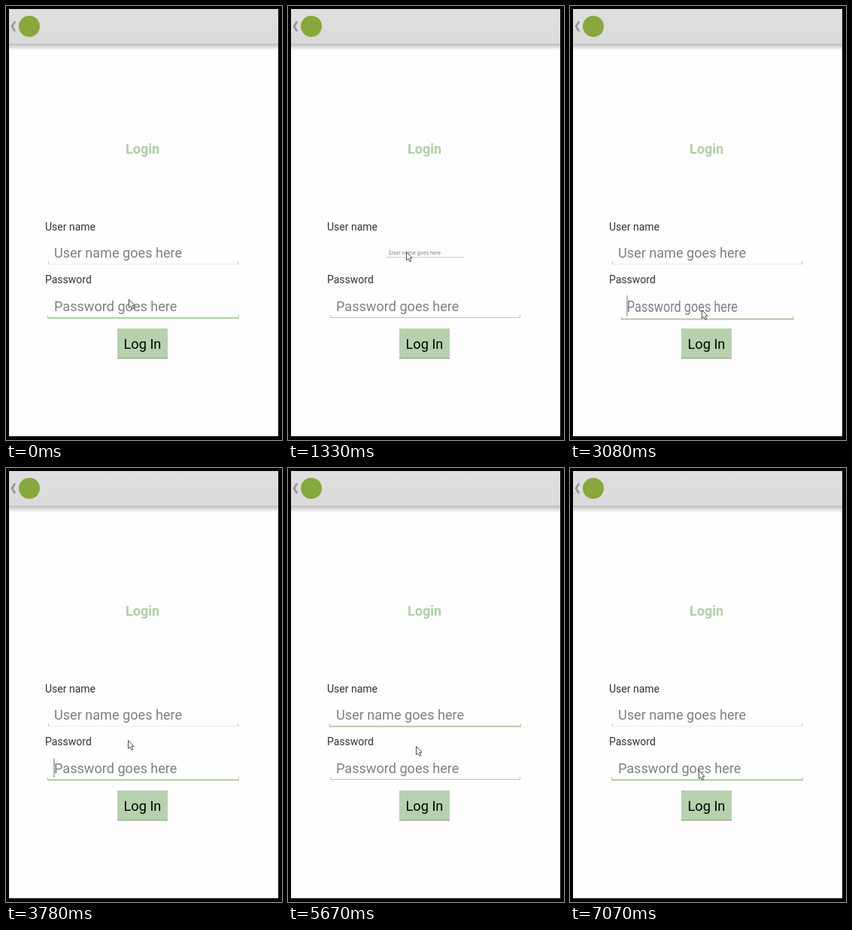
Write an HTML page with a canvas that moves like this. It is 367 px wide and 576 px high and loops after 7490 ms.

```html
<!DOCTYPE html>
<html lang="en">
<head>
<meta charset="utf-8">
<title>Login form</title>
<style>
html, body { margin: 0; width: 100%; height: 100%; overflow: hidden; background: #000; }
canvas { display: block; }
</style>
</head>
<body>
<canvas id="stage" width="367" height="576"></canvas>
<script>
const c = document.getElementById('stage').getContext('2d');
const LOOP = 7490, STEP = 70, ANIM = 500, BLINK = 490;
// The focus goes to the name, then to the password, and round again
const FIRST_CLICK = 980, ROUND = 3780, NAME_TIME = 1820;
const GREEN = '#b0cfa5', GRAY = '#bfc3c1', FAINT = '#ebebeb';

const moves = [
  { start: 210, end: 840, x: 157, y: 326 },
  { start: 1680, end: 2450, x: 175, y: 403 },
  { start: 3500, end: 4620, x: 161, y: 330 },
  { start: 5460, end: 6370, x: 171, y: 401 }
];

const easeInOut = p => (1 - Math.cos(Math.PI * p)) / 2;
const easeOut = (p, power) => 1 - (1 - p) ** power;

// Evenly spaced values, linear in between
function through(values, p) {
  const x = p * (values.length - 1), i = Math.min(Math.floor(x), values.length - 2);
  return values[i] + (values[i + 1] - values[i]) * (x - i);
}

// Sideways travel settles before the vertical one
function pointerAt(t) {
  let x = 163, y = 389;
  for (const m of moves) {
    const p = Math.min(1, Math.max(0, (t - m.start) / (m.end - m.start)));
    x += (m.x - x) * easeOut(p, 8);
    y += (m.y - y) * easeOut(p, 3);
  }
  return [Math.round(x), Math.round(y)];
}

function rect(x, y, w, h, color) {
  c.fillStyle = color;
  c.fillRect(x, y, w, h);
}

function text(s, x, y, size, color, weight = 400) {
  c.font = `${weight} ${size}px Roboto, sans-serif`;
  c.fillStyle = color;
  c.fillText(s, x, y);
}

function fade(y0, y1, from, to) {
  const g = c.createLinearGradient(0, y0, 0, y1);
  g.addColorStop(0, from);
  g.addColorStop(1, to);
  rect(4, y0, 358, y1 - y0, g);
}

// Input field, scaled about its centre cy
function field(hint, cy, sx, sy, focused, idleLine, caret) {
  const half = focused ? 127.5 : 126.5, thick = focused ? 2 : 1;
  c.save();
  c.translate(182.5, cy);
  c.scale(sx, sy);
  text(hint, -118.5, 6.5, 18.1, '#808080');
  rect(-half, 14.5, half * 2, thick, focused ? GREEN : idleLine);
  for (const x of [-half, half - 1]) rect(x, 11.5, 1, 3 + thick, focused ? GREEN : GRAY);
  if (focused && caret) rect(-119.5, -13, 2, 25, '#b0b0b0');
  c.restore();
}

function pointer(x, y) {
  c.save();
  c.translate(x + .5, y + .5);
  c.beginPath();
  [[0, 0], [0, 11], [2.5, 8.8], [4.3, 12.8], [6.2, 12], [4.5, 8], [7.5, 7.8]]
    .forEach(p => c.lineTo(...p));
  c.closePath();
  c.fillStyle = '#fff';
  c.strokeStyle = '#505050';
  c.lineWidth = 1;
  c.fill();
  c.stroke();
  c.restore();
}

function page() {
  rect(0, 0, 367, 576, '#000');
  rect(4, 4, 358, 567, '#fefefe');
  fade(4, 50, '#dfdfdf', '#dadada');
  fade(50, 59, '#bcbcbc', '#fefefe');

  c.beginPath();
  c.moveTo(12, 20.5);
  c.lineTo(8, 27);
  c.lineTo(12, 33.5);
  c.strokeStyle = '#959595';
  c.lineWidth = 2.6;
  c.stroke();

  c.beginPath();
  c.arc(31, 27, 14, 0, 7);
  c.fillStyle = '#86a83c';
  c.fill();

  text('Login', 159, 196, 18, GREEN, 700);
  text('User name', 52, 298, 14, '#333');
  text('Password', 52, 368, 14, '#333');

  rect(148, 428, 67, 39, '#b7d1ae');
  rect(148, 467, 67, 1, '#8a9c86');
  text('Log In', 156.5, 455, 18.2, '#000');
}

function draw() {
  const t = Math.floor(performance.now() % LOOP / STEP) * STEP;
  const turn = (t - FIRST_CLICK + LOOP) % LOOP % ROUND;
  const onName = turn < NAME_TIME;
  const since = onName ? turn : turn - NAME_TIME;
  const caret = since % (2 * BLINK) < BLINK;
  const p = Math.min(1, since / ANIM);

  const shrink = onName ? through([1, 0, 1], p) : 1;
  const band = onName ? 0 : easeInOut(p);

  page();
  field('User name goes here', 327.5, shrink, shrink, onName, FAINT, caret);
  field('Password goes here', 398.5,
    through([1, 1.25, .75, 1.15, 1], band),
    through([1, .75, 1.25, .85, 1], band),
    !onName, GRAY, caret);
  pointer(...pointerAt(t));
  requestAnimationFrame(draw);
}
draw();
</script>
</body>
</html>
```
